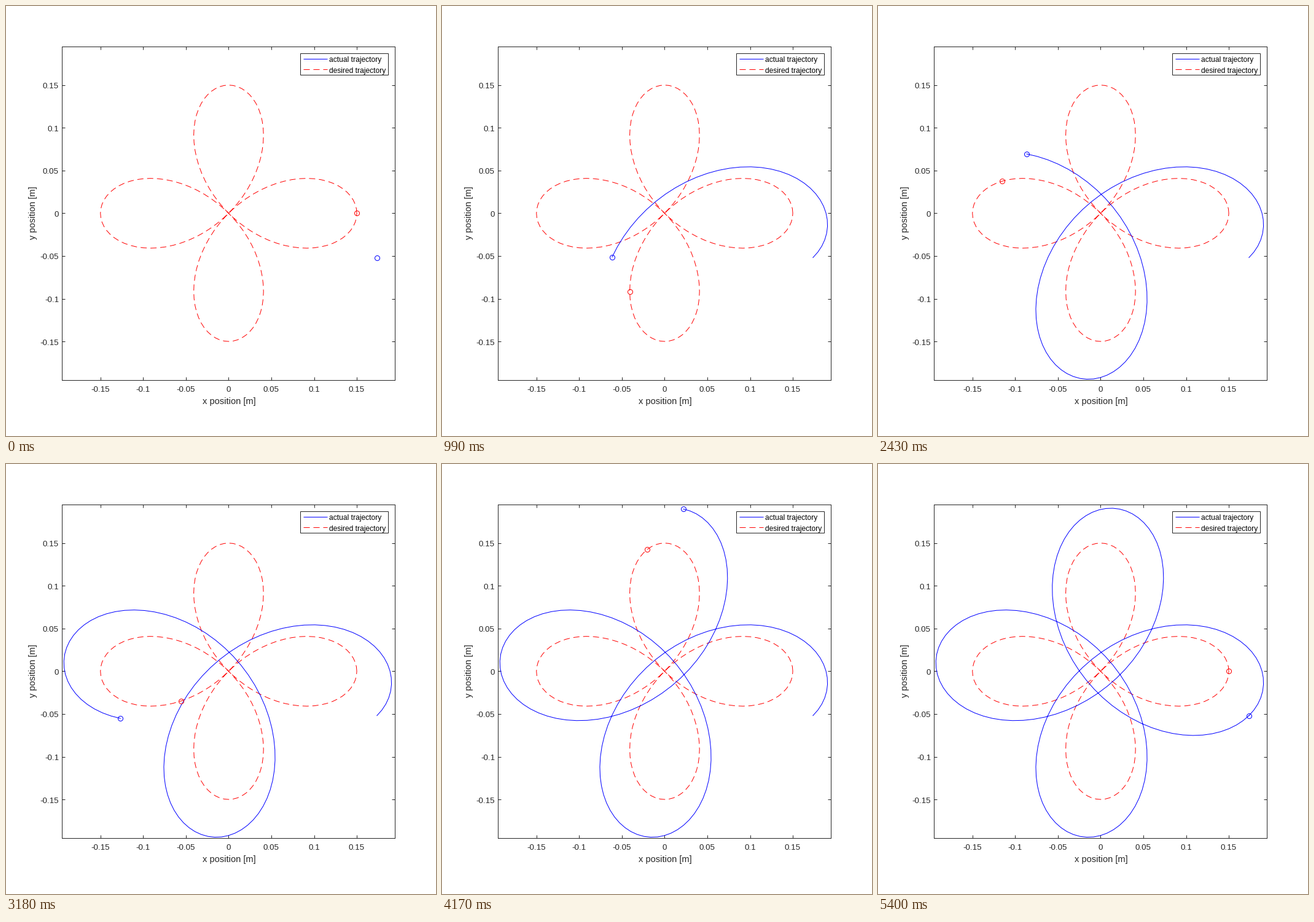
Animation, 700 px wide and 700 px high, one loop 5.43 s. Source, as a matplotlib script:

```python
import matplotlib.pyplot as plt
import numpy as np
from matplotlib.animation import FuncAnimation
from matplotlib.lines import Line2D
from matplotlib.patches import Rectangle

SIZE, DPI = 700, 100
FRAMES, INTERVAL = 181, 30
SCALE = 1391                       # pixels per metre
X0, Y0 = 362.4, 337.4              # pixel position of the origin
LEFT, RIGHT, TOP, BOTTOM = 91, 633, 66, 609
INK, BLUE, RED = "#262626", "#0000ff", "#ff0000"
DASH = (0, (10, 6))

plt.rcParams["font.family"] = "Liberation Sans"


def px(n):
    """Pixels to points."""
    return n * 72 / DPI


def label(x, y, s, size, color=INK, **kw):
    fig.text(x / SIZE, 1 - y / SIZE, s, fontsize=px(size), color=color,
             va="baseline", **kw)


def desired(t):
    r = 0.15 * np.cos(2 * t)
    return r * np.cos(t), r * np.sin(t)


def actual(t):
    """Steady response of both axes to the rose's first and third harmonics."""
    c1, s1, c3, s3 = np.cos(t), np.sin(t), np.cos(3 * t), np.sin(3 * t)
    x = -0.0011 + 0.0869 * c1 + 0.0063 * s1 + 0.0878 * c3 + 0.0580 * s3
    y = -0.0017 + 0.0073 * c1 - 0.0875 * s1 - 0.0575 * c3 + 0.0881 * s3
    return x, y


fig = plt.figure(figsize=(SIZE / DPI, SIZE / DPI), dpi=DPI, facecolor="white")
ax = fig.add_axes([LEFT / SIZE, 1 - BOTTOM / SIZE,
                   (RIGHT - LEFT) / SIZE, (BOTTOM - TOP) / SIZE])
ax.set_xlim((LEFT - X0) / SCALE, (RIGHT - X0) / SCALE)
ax.set_ylim((Y0 - BOTTOM) / SCALE, (Y0 - TOP) / SCALE)

ticks = np.arange(-3, 4) * 0.05
ax.set_xticks(ticks)
ax.set_yticks(ticks)
ax.tick_params(direction="in", top=True, right=True, length=px(5),
               width=px(1), color=INK, labelbottom=False, labelleft=False)
for spine in ax.spines.values():
    spine.set(linewidth=px(1), edgecolor=INK)

for v in ticks:
    text = f"{round(v, 2):g}"
    label(X0 + v * SCALE, 628, text, 13.33, ha="center")
    label(86, Y0 - v * SCALE + 5.5, text, 13.33, ha="right")
label(363, 648, "x position [m]", 14.67, ha="center")
label(48, 337, "y position [m]", 14.67, ha="center", rotation=90,
      rotation_mode="anchor")

# Legend
fig.add_artist(Rectangle((479 / SIZE, 1 - 112 / SIZE), 143 / SIZE,
                         35 / SIZE, facecolor="white", edgecolor=INK,
                         linewidth=px(1), zorder=5))
for y, s, color, style in ((86, "actual trajectory", BLUE, "-"),
                           (103, "desired trajectory", RED, DASH)):
    fig.add_artist(Line2D([484 / SIZE, 523 / SIZE], [1 - y / SIZE] * 2,
                          color=color, linestyle=style, linewidth=px(1),
                          dash_capstyle="butt", solid_capstyle="butt",
                          zorder=6))
    label(526, y + 5.5, s, 12, color="black", zorder=6)

theta = np.linspace(0, 2 * np.pi, FRAMES)
goal_x, goal_y = desired(theta)
path_x, path_y = actual(theta)

ax.plot(goal_x, goal_y, color=RED, linestyle=DASH, linewidth=px(1),
        dash_capstyle="butt")
trail, = ax.plot([], [], color=BLUE, linewidth=px(1), clip_on=False)
ring = dict(marker="o", markersize=px(8), markerfacecolor="none",
            markeredgewidth=px(1), linestyle="none", clip_on=False, zorder=4)
goal_dot, = ax.plot([], [], markeredgecolor=RED, **ring)
path_dot, = ax.plot([], [], markeredgecolor=BLUE, **ring)


def update(i):
    trail.set_data(path_x[:i + 1], path_y[:i + 1])
    goal_dot.set_data([goal_x[i]], [goal_y[i]])
    path_dot.set_data([path_x[i]], [path_y[i]])
    return trail, goal_dot, path_dot


anim = FuncAnimation(fig, update, frames=FRAMES, interval=INTERVAL,
                     repeat=True, repeat_delay=0)
plt.show()
```
